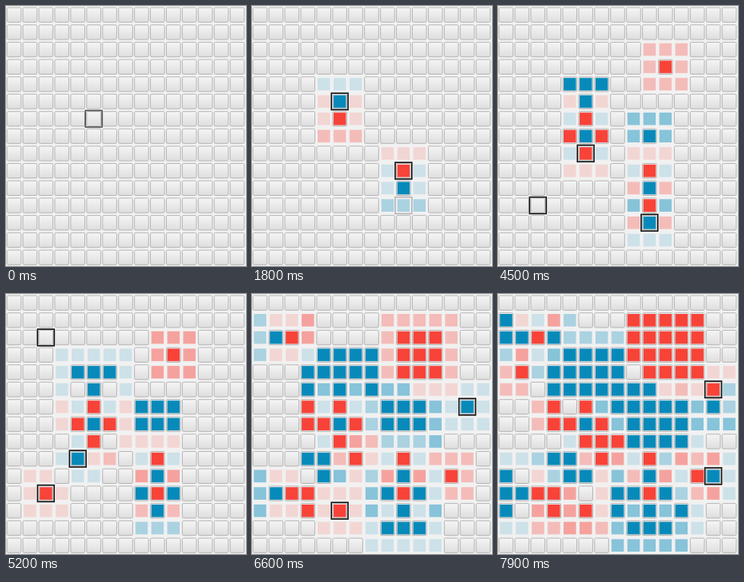
Animation, 300 px wide and 326 px high, one loop 8 s. Source, as an HTML page:

```html
<!DOCTYPE html>
<html lang="en">
<head>
<meta charset="utf-8">
<style>
html, body { margin: 0; width: 100%; height: 100%; overflow: hidden; background: #f1f1f1; }
svg { display: block; width: 300px; height: 326px; }
</style>
</head>
<body>
<svg id="stage" viewBox="0 0 300 326">
  <defs>
    <linearGradient id="tile" x1="0" y1="0" x2="0" y2="1">
      <stop offset="0" stop-color="#f5f5f5"/>
      <stop offset="1" stop-color="#dedede"/>
    </linearGradient>
  </defs>
  <rect width="300" height="326" fill="#f1f1f1"/>
</svg>
<script>
const LOOP = 8000, SIZE = 15, FULL = 4, FADE = 200;
const PITCH_X = 19.93, PITCH_Y = 21.72;
const RED = "#f84339", BLUE = "#078aba";

const stage = document.getElementById("stage");
const clamp = x => Math.max(0, Math.min(1, x));
const mix = (a, b, p) => a + (b - a) * p;

// The game: stones on open ground, and replies placed beside a rival stone
const red = [], blue = [];
const at = (col, row) => ({ col, row });
const above = (s, n = 1) => at(s.col, s.row - n);
const below = s => at(s.col, s.row + 1);
const left = s => at(s.col - 1, s.row);
const right = s => at(s.col + 1, s.row);
const play = (r, b) => { red.push(r); blue.push(b); };

play(at(5, 6), at(9, 10));
play(above(blue[0]), above(red[0]));
play(below(blue[0]), above(red[1], 2));
play(at(10, 3), below(red[0]));
play(below(blue[3]), below(red[2]));
play(at(2, 11), left(below(red[4])));
play(at(2, 2), left(red[5]));
play(at(12, 10), left(red[6]));
play(at(5, 12), at(13, 6));
play(at(1, 4), right(red[6]));
play(above(blue[8]), right(red[7]));

// Turns follow one another faster and faster
const turnTime = i => 400 + 990 * i - 30 * i * i;

// Levels run from -FULL (red stone) to FULL (blue stone)
const isStone = level => Math.abs(level) === FULL;
const index = ({ col, row }) => row * SIZE + col;

// Stones pull each neighbouring cell one level towards their colour per turn
function advance(board, turn) {
  const now = board.slice();
  now[index(red[turn])] = -FULL;
  now[index(blue[turn])] = FULL;
  return now.map((level, i) => {
    if (isStone(level)) return level;
    const col = i % SIZE, row = Math.floor(i / SIZE);
    let pull = 0;
    for (let y = Math.max(0, row - 1); y <= Math.min(SIZE - 1, row + 1); y++) {
      for (let x = Math.max(0, col - 1); x <= Math.min(SIZE - 1, col + 1); x++) {
        const other = now[index(at(x, y))];
        if (isStone(other)) pull += Math.sign(other);
      }
    }
    return level + Math.sign(pull);
  });
}

const boards = [new Array(SIZE * SIZE).fill(0)];
red.forEach((_, turn) => boards.push(advance(boards[turn], turn)));

function rect(x, y, width, height, attrs) {
  const node = document.createElementNS("http://www.w3.org/2000/svg", "rect");
  const all = { x, y, width, height, ...attrs };
  for (const key in all) node.setAttribute(key, all[key]);
  return stage.appendChild(node);
}

const cells = boards[0].map((_, i) => {
  const x = (i % SIZE) * PITCH_X, y = Math.floor(i / SIZE) * PITCH_Y;
  return {
    frame: rect(x + 1.2, y + 2, 17.6, 18.3, { rx: 1.5, fill: "url(#tile)", stroke: "#b5b5b5" }),
    tint: rect(x + 2.3, y + 3.3, 15.5, 15.7, { opacity: 0 })
  };
});

const cursor = ({ col, row }) => rect(col * PITCH_X - 0.4, row * PITCH_Y + 0.7, 20.8, 20.8,
  { fill: "none", stroke: "#111", "stroke-width": 1.6, opacity: 0 });
const redCursors = red.map(cursor), blueCursors = blue.map(cursor);

const frameOpacity = level => level === 0 || isStone(level) ? 1 : 0;
const tintOpacity = level => isStone(level) ? 1 : Math.abs(level) * 0.152;

function drawCell({ frame, tint }, from, to, p) {
  frame.setAttribute("opacity", mix(frameOpacity(from), frameOpacity(to), p));
  tint.setAttribute("opacity", mix(tintOpacity(from), tintOpacity(to), p));
  tint.setAttribute("fill", (to || from) < 0 ? RED : BLUE);
}

function draw(t) {
  const done = red.filter((_, i) => turnTime(i) <= t).length;
  const p = done ? clamp((t - turnTime(done - 1)) / FADE) : 1;
  const before = boards[Math.max(0, done - 1)], after = boards[done];
  cells.forEach((cell, i) => drawCell(cell, before[i], after[i], p));

  // Red aims ahead of its turn; blue answers at once
  red.forEach((_, i) => {
    const start = turnTime(i);
    const aim = start - 0.6 * (start - turnTime(i - 1));
    const end = i + 1 < red.length ? turnTime(i + 1) : LOOP;
    const stay = 1 - clamp((t - end) / FADE);
    redCursors[i].setAttribute("opacity", clamp((t - aim) / 300) * stay);
    blueCursors[i].setAttribute("opacity", clamp((t - start) / FADE) * stay);
  });
}

const began = performance.now();
function tick() {
  draw((performance.now() - began) % LOOP);
  requestAnimationFrame(tick);
}
tick();
</script>
</body>
</html>
```
